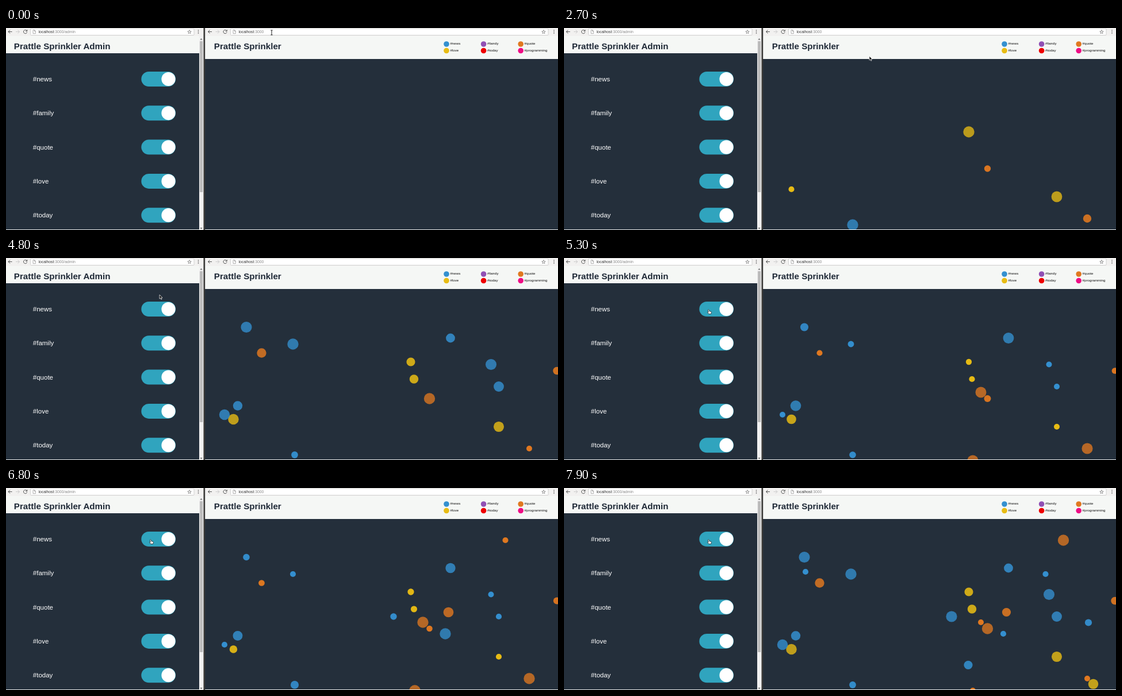
These frames come from a looping animation (960x352 px, 8 s). An HTML page:

```html
<!DOCTYPE html>
<html lang="en">
<head>
<meta charset="utf-8">
<title>Hashtag dots</title>
<style>
  html, body { margin: 0; width: 100%; height: 100%; overflow: hidden; background: #242f3b; }
  svg { display: block; width: 960px; height: 352px; font-family: "Liberation Sans", Arial, sans-serif; }
  .title { font-size: 15.15px; font-weight: bold; fill: #1f2937; }
  .label { font-size: 11.5px; fill: #fff; }
  .key { font-size: 6.2px; fill: #111; }
  .url { font-size: 6.8px; fill: #333; }
  .url tspan { fill: #8a8a8a; }
</style>
</head>
<body>
<svg id="stage" viewBox="0 0 960 352">
  <defs>
    <clipPath id="field"><rect x="346" y="54" width="614" height="297"/></clipPath>
    <g id="nav" fill="none" stroke="#555" stroke-width="1">
      <path d="M10.5 6.5H4M7 3.5L4 6.5L7 9.5"/>
      <path d="M17 6.5H23.5M20.5 3.5L23.5 6.5L20.5 9.5" stroke="#ccc"/>
      <path d="M36 4.6A3.1 3.1 0 1 0 36.6 7.2M36.8 3V5.5H34.3"/>
    </g>
    <path id="page" d="M-2 -3H.7L2.3 -1.4V3H-2ZM.5 -3V-1.2H2.3" fill="#fff" stroke="#888" stroke-width=".7"/>
    <path id="star" d="M0 -3.2L.9 -1L3.2 -.9L1.4 .6L2 2.8L0 1.6L-2 2.8L-1.4 .6L-3.2 -.9L-.9 -1Z" fill="none" stroke="#666" stroke-width=".7"/>
    <g id="menu" fill="#555"><circle cy="-2.6" r=".8"/><circle r=".8"/><circle cy="2.6" r=".8"/></g>
  </defs>
  <rect width="960" height="352" fill="#242f3b"/>
  <g id="chrome"></g>
  <g id="admin"></g>
  <g id="legend"></g>
  <g id="dots" clip-path="url(#field)"></g>
  <g id="cursor">
    <path id="beam" d="M-1.6 -4H1.6M0 -4V4M-1.6 4H1.6" fill="none" stroke="#222" stroke-width="1"/>
    <path id="arrow" d="M0 0V7.2L1.7 5.7L2.9 8.3L4.1 7.7L2.9 5.2H5.1Z" fill="#111" stroke="#fff" stroke-width=".7"/>
    <path id="hand" d="M-.6 0Q.3 -.5 .8 .4L1.4 2.8L4.4 3.4Q5 3.7 4.8 4.6L4.2 7.5H.4L-2 4.6Q-2 3.5 -.7 4.1L-.2 4.4L-1 .7Z" fill="#fff" stroke="#111" stroke-width=".7"/>
  </g>
</svg>
<script>
const LOOP = 8000, STEP = 100, PULSE = 775;
const NAME = "Prattle Sprinkler";
const COLORS = {
  news: "#3490d0", family: "#9050b4", quote: "#e07820",
  love: "#e8bc14", today: "#ee0000", programming: "#ee0c84"
};

// tag, x, y, time it appears, time within the pulse when it is smallest
const DOTS = [
  ["love", 395.5, 281, 700, 425], ["love", 704, 181, 800, 725],
  ["quote", 736.5, 245, 1100, 505], ["love", 857, 294, 1200, 665],
  ["news", 502, 343, 1700, 10], ["quote", 910, 332, 2300, 185],
  ["quote", 958, 196.5, 3000, 750], ["news", 499, 150, 3100, 540],
  ["news", 773, 139.5, 3200, 360], ["quote", 444.5, 165.5, 3400, 705],
  ["news", 418, 120.5, 3600, 465], ["love", 709.5, 211, 3700, 720],
  ["news", 843.5, 185.5, 3900, 620], ["news", 380, 273, 4000, 650],
  ["news", 857, 224, 4100, 670], ["news", 403, 257.5, 4300, 370],
  ["quote", 725, 234, 5200, 180], ["quote", 711, 353, 5300, 190],
  ["news", 764, 254, 5500, 205], ["quote", 769.5, 216.5, 5600, 350],
  ["quote", 868.5, 91, 6400, 540], ["news", 674, 224, 6600, 470],
  ["news", 703, 308.5, 7100, 725], ["love", 920.5, 341.5, 7300, 680],
  ["news", 420, 146, 7300, 100], ["news", 912, 234.5, 7400, 0],
  ["news", 837.5, 150, 7500, 80]
];

// time, x, y of the pointer tip
const PATH = [
  [0, 462, 8], [950, 462, 8], [1400, 513, 35], [1500, 513, 35],
  [1800, 531, 49], [4400, 531, 49], [4500, 445, 50], [4600, 370, 24],
  [4800, 267, 64], [5200, 251.5, 90], [LOOP, 251.5, 90]
];

const $ = id => document.getElementById(id);

function add(parent, tag, attrs, text) {
  const el = document.createElementNS("http://www.w3.org/2000/svg", tag);
  for (const key in attrs) el.setAttribute(key, attrs[key]);
  if (text) el.textContent = text;
  parent.appendChild(el);
  return el;
}

const rect = (parent, x, y, width, height, fill, more) =>
  add(parent, "rect", { x, y, width, height, fill, ...more });
const label = (parent, cls, x, y, text) =>
  add(parent, "text", { class: cls, x, y }, text);
const use = (parent, id, x, y) =>
  add(parent, "use", { href: "#" + id, x, y });

function browser(x, width, headerEnd, path, starX, menuX, title, titleX) {
  const g = $("chrome");
  rect(g, x, 0, width, 14, "#f2f1f0");
  rect(g, x, 14, width, headerEnd - 14, "#f5f7f5");
  use(g, "nav", x && 347.5, 0);
  const barX = x ? 390.5 : 42.5;
  rect(g, barX, 1, starX + 8 - barX, 11.5, "#fff", { stroke: "#c8c8c8", "stroke-width": .8, rx: 1 });
  use(g, "page", barX + 6.5, 6.7);
  const url = label(g, "url", barX + 14, 9.2, "localhost");
  add(url, "tspan", {}, ":3000" + path);
  use(g, "star", starX, 6.8);
  use(g, "menu", menuX, 6.7);
  label(g, "title", titleX, 37.3, title);
}

function buildAdmin() {
  const g = $("admin");
  rect(g, 336, 14, 8, 338, "#f1f1f1");
  rect(g, 337, 23, 5, 263, "#bcbcbc");
  add(g, "path", { d: "M337.5 20.5L339.5 18L341.5 20.5ZM337.5 348L339.5 350.5L341.5 348Z", fill: "#666" });
  ["news", "family", "quote", "love", "today"].forEach((tag, i) => {
    const y = 89 + i * 59.3;
    label(g, "label", 46.8, y + 4, "#" + tag);
    rect(g, 235.3, y - 13, 59.7, 26, "#30a4be", { rx: 13 });
    add(g, "circle", { cx: 282.5, cy: y, r: 12.1, fill: "#fff" });
  });
  rect(g, 0, 351, 960, 1, "#eef0ee");
  rect(g, 343.5, 0, 2.7, 352, "#3a3a38");
}

function buildLegend() {
  const g = $("legend");
  ["news", "family", "quote", "love", "today", "programming"].forEach((tag, i) => {
    const x = 766 + (i % 3) * 64.6, y = i < 3 ? 28 : 39.5;
    add(g, "circle", { cx: x, cy: y, r: 4.8, fill: COLORS[tag] });
    label(g, "key", x + 6.4, y + 1.4, "#" + tag);
  });
}

browser(0, 344, 44, "/admin", 319, 334.5, NAME + " Admin", 13.8);
browser(346, 614, 54, "", 935, 953, NAME, 361.8);
buildAdmin();
buildLegend();

const dots = DOTS.map(([tag, cx, cy, start, low]) => ({
  el: add($("dots"), "circle", { cx, cy, fill: COLORS[tag] }), start, low
}));

const ease = u => u < .5 ? 4 * u ** 3 : 1 - 4 * (1 - u) ** 3;

function drawDot({ el, start, low }, t) {
  const p = ((t - low + PULSE) % PULSE) / PULSE;
  const e = ease(1 - Math.abs(2 * p - 1));
  el.setAttribute("visibility", t < start ? "hidden" : "visible");
  el.setAttribute("r", 5 + 4.7 * e);
  el.setAttribute("opacity", 1 - .23 * e);
}

function drawCursor(t) {
  const i = PATH.findIndex(p => p[0] > t);
  const [t0, x0, y0] = PATH[i - 1], [t1, x1, y1] = PATH[i];
  const u = (t - t0) / (t1 - t0);
  const x = x0 + (x1 - x0) * u, y = y0 + (y1 - y0) * u;
  const overToggle = x > 235 && x < 295 && y > 76 && y < 102;
  const shape = y < 14 ? "beam" : overToggle ? "hand" : "arrow";
  $("cursor").setAttribute("transform", `translate(${x} ${y})`);
  for (const id of ["beam", "arrow", "hand"])
    $(id).setAttribute("visibility", id === shape ? "visible" : "hidden");
}

const origin = performance.now();
function draw() {
  const t = Math.floor(((performance.now() - origin) % LOOP) / STEP) * STEP;
  dots.forEach(dot => drawDot(dot, t));
  drawCursor(t);
  requestAnimationFrame(draw);
}
draw();
</script>
</body>
</html>
```
